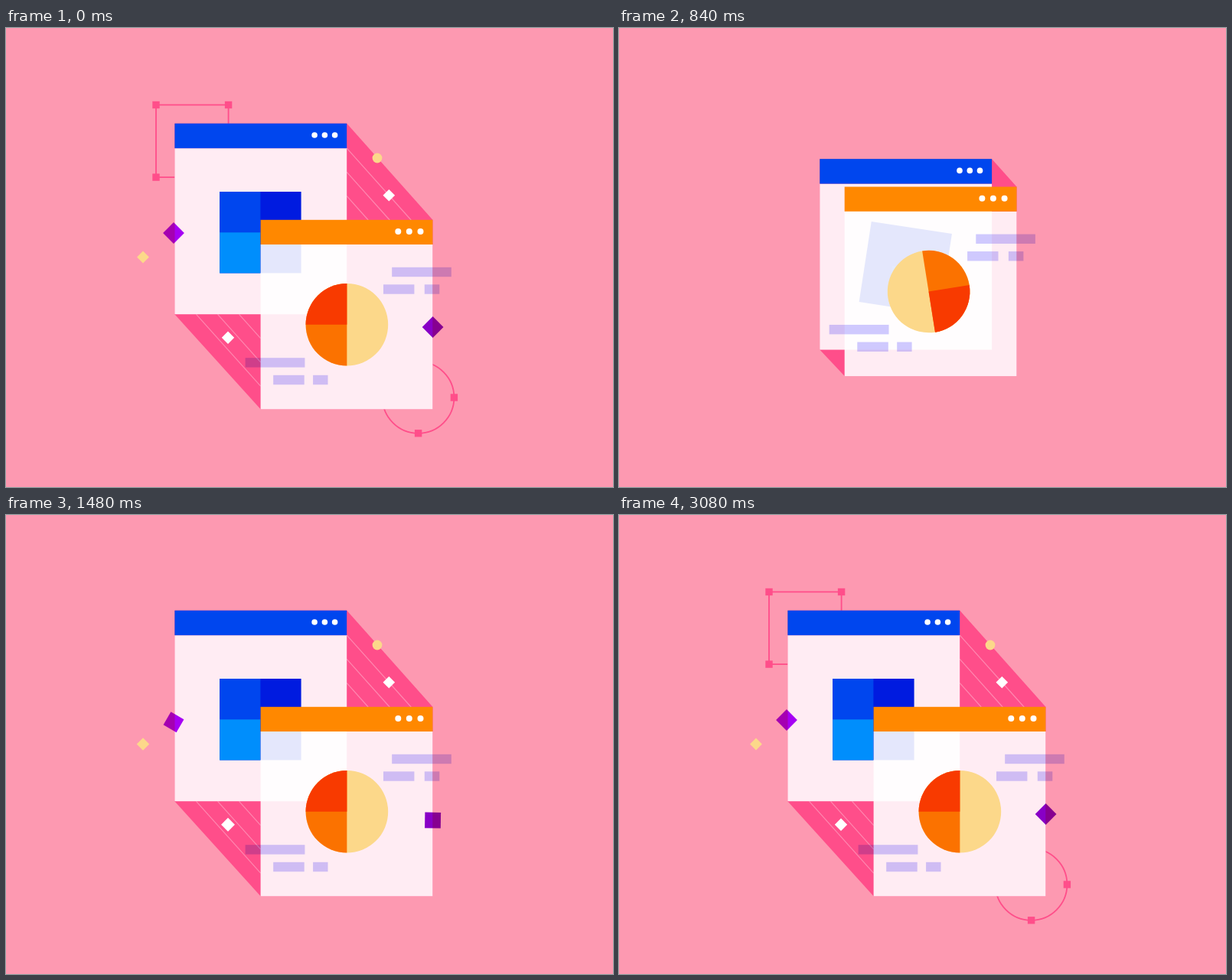
These frames come from a looping animation (793 by 600 pixels, 3.12 s). An HTML page with a canvas:

```html
<!DOCTYPE html>
<html>
<head>
<meta charset="utf-8">
<style>
html, body { margin: 0; width: 100%; height: 100%; overflow: hidden; background: #fd99b1; }
canvas { display: block; }
</style>
</head>
<body>
<canvas id="stage" width="793" height="600"></canvas>
<script>
const ctx = document.getElementById('stage').getContext('2d');
const LOOP = 3120, STEP = 40, RAD = Math.PI / 180;
const PINK = '#ff4e8a', YELLOW = '#fcd88a', W = 224.8;

const clamp = x => Math.max(0, Math.min(1, x));
const mix = (a, b, p) => a + (b - a) * p;
// Ease in and out from `start` over `length` ms, with power n.
function inOut(t, start, length, n = 3) {
  const x = clamp((t - start) / length);
  return x < .5 ? (2 * x) ** n / 2 : 1 - (2 - 2 * x) ** n / 2;
}
// Grows quickly past full size, then settles at 1.
function pop(age) {
  if (age <= 0) return 0;
  if (age < 100) return 2.4 * age / 100;
  return 1 + 1.4 * (1 - clamp((age - 100) / 500)) ** 3;
}

function rect(x, y, w, h, color) {
  ctx.fillStyle = color;
  ctx.fillRect(x, y, w, h);
}
function disc(x, y, r, color) {
  ctx.fillStyle = color;
  ctx.beginPath();
  ctx.arc(x, y, Math.max(0, r), 0, 2 * Math.PI);
  ctx.fill();
}
function at(x, y, angle, scale, draw) {
  ctx.save();
  ctx.translate(x, y);
  ctx.rotate(angle * RAD);
  ctx.scale(scale, scale);
  draw();
  ctx.restore();
}
function multiply(draw) {
  ctx.globalCompositeOperation = 'multiply';
  draw();
  ctx.globalCompositeOperation = 'source-over';
}
function diamond(x, y, half, scale, color, spin = 0) {
  const side = half * Math.SQRT2;
  at(x, y, 45 + spin, scale, () => rect(-side / 2, -side / 2, side, side, color));
}

function outlines(t) {
  const decay = Math.exp(-Math.max(0, t - 1630) / 288), rest = Math.exp(-1450 / 288);
  const angle = -180 * Math.max(0, (decay - rest) / (1 - rest));
  const size = t > 1546 ? 1 - Math.exp((1546 - t) / 168) : 0;
  if (!size) return;
  const marker = (x, y) => rect(x - 4.7, y - 4.7, 9.4, 9.4, PINK);
  ctx.strokeStyle = PINK;
  ctx.lineWidth = 1.8;
  at(243.3, 147.8, angle, size, () => {
    ctx.strokeRect(-47.3, -47.3, 94.6, 94.6);
    for (const x of [-47.3, 47.3]) for (const y of [-47.3, 47.3]) marker(x, y);
  });
  at(538.6, 483, angle, size, () => {
    ctx.beginPath();
    ctx.arc(0, 0, 46.8, 0, 2 * Math.PI);
    ctx.stroke();
    for (const [x, y] of [[1, 0], [0, 1], [-1, 0], [0, -1]]) marker(x * 46.8, y * 46.8);
  });
}

function fold(t, back, front) {
  const points = [
    [back.x, back.y], [back.x + W, back.y], [front.x + W, front.y],
    [front.x + W, front.y + front.h], [front.x, front.y + front.h], [back.x, back.y + back.h]
  ];
  ctx.fillStyle = PINK;
  ctx.beginPath();
  points.forEach(p => ctx.lineTo(...p));
  ctx.fill();

  ctx.strokeStyle = 'rgba(255,255,255,.32)';
  ctx.lineWidth = 1.2;
  for (let i = 1; i < 4; i++) {
    const grow = inOut(t, 1060 + i * 40, 260);
    if (!grow) continue;
    const dx = 112 - 28 * i, dy = dx * 1.118;
    ctx.beginPath();
    ctx.moveTo(445.2, 251 - dy);
    ctx.lineTo(445.2 + dx * grow, 251 - dy + dy * grow);
    ctx.moveTo(332.6 - dx, 374.3);
    ctx.lineTo(332.6 - dx + dx * grow, 374.3 + dy * grow);
    ctx.stroke();
  }
}

function pane(t, { x, y, h, head, color, dots, r }, start) {
  const wide = W * inOut(t, start, 250);
  const drop = inOut(t, start + 170, 280);
  rect(x, y + head, W, (h - head) * drop, 'rgba(255,255,255,.893)');
  rect(x + (W - wide) / 2, y, wide, head, color);
  dots.forEach((dx, i) => {
    const delay = start + 140 + i * 10;
    const lift = -60 * (1 - inOut(t, delay, 230));
    disc(x + dx, y + 15.2 + lift, r * clamp((t - delay) / 90), '#fff');
  });
}

function tiles(t, back) {
  const size = 106.4 * inOut(t, 560, 220);
  if (!size) return;
  const angle = -90 * (1 - inOut(t, 680, 553));
  const part = size / 2 * inOut(t, 740, 230);
  at(back.x + 112, back.y + 142.4, angle, 1, () => {
    rect(-size / 2, -size / 2, size, size, '#001be0');
    rect(-part, -part, part, part, '#0046ee');
    rect(-part, 0, part, part, '#008efc');
  });
}

function pie(t, front, apart) {
  const size = inOut(t, 200, 255);
  const half = inOut(t, 240, 248);
  const turn = 180 * (1 - inOut(t, 667, 615, 4)) + 90 * (1 - size);
  const slice = (sweep, color) => {
    ctx.fillStyle = color;
    ctx.beginPath();
    ctx.moveTo(0, 0);
    ctx.arc(0, 0, 53.8, -sweep * RAD, 0);
    ctx.fill();
  };
  at(front.x + mix(108.7, 112.8, apart), front.y + 137, 270 + turn, size, () => {
    slice(360 * size, YELLOW);
    slice(180 * half, '#fb7200');
    slice(90 * half, '#f83a00');
  });
}

function bars(t, front) {
  const list = [
    [171.6, 62, 77.6, 183], [160.4, 84.5, 40.4, 197], [214.2, 84.5, 19.5, 243],
    [-20, 180.4, 77.8, 423], [16.6, 203, 40.5, 437], [68.5, 203, 19.4, 483]
  ];
  multiply(() => list.forEach(([x, y, w, start]) =>
    rect(front.x + x, front.y + y, w * inOut(t, start, 250), 12.4, '#cfcbff')));
}

function confetti(t) {
  disc(485, 170, 6.4 * pop(t - 900), YELLOW);
  diamond(500.3, 218.8, 7.8, pop(t - 900), '#fff');
  diamond(290, 404.8, 8.2, pop(t - 1080), '#fff');
  diamond(179, 299.5, 7.9, pop(t - 1040), YELLOW);
  const gem = (x, y, start, length, color) => {
    const left = 1 - inOut(t, start, length);
    diamond(x, y + 33 * left, 13.9, pop(t - start), color, -180 * left);
  };
  multiply(() => {
    gem(219, 268, 900, 800, '#a600ff');
    gem(557.6, 391, 1050, 710, '#8800d0');
  });
}

function draw(t) {
  rect(0, 0, 793, 600, '#fd99b1');
  const apart = inOut(t, 611, 550);
  const back = {
    x: mix(279.3, 220.4, apart), y: mix(190, 124.8, apart), h: 249.4,
    head: 32.4, color: '#0046ee', dots: [182.7, 196, 209.2], r: 3.8
  };
  const front = {
    x: mix(279.3, 332.6, apart), y: mix(190, 250.8, apart), h: 247.5,
    head: 32.2, color: '#ff8800', dots: [179.7, 194.2, 208.9], r: 4
  };
  outlines(t);
  if (apart > 0) fold(t, back, front);
  pane(t, back, 360);
  tiles(t, back);
  pane(t, front, 120);
  pie(t, front, apart);
  bars(t, front);
  confetti(t);
}

const begin = performance.now();
function tick() {
  const t = Math.floor((performance.now() - begin) % LOOP / STEP) * STEP;
  draw(t || LOOP); // the loop opens on the finished picture
  requestAnimationFrame(tick);
}
tick();
</script>
</body>
</html>
```
